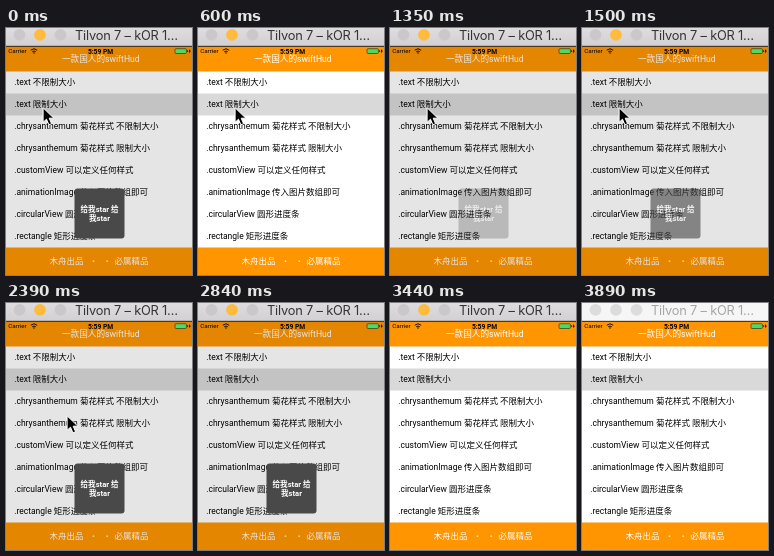
An HTML page that plays this animation: 186x247 px, repeating every 3.99 s.

```html
<!DOCTYPE html>
<html lang="zh-CN">
<head>
<meta charset="utf-8">
<title>HUD demo</title>
<style>
html, body { margin: 0; width: 100%; height: 100%; overflow: hidden; background: #fff; }
svg { display: block; width: 100vw; height: 100vh; }
text { font-family: Roboto, "Noto Sans CJK SC", "Noto Sans CJK", sans-serif; font-size: 8.5px; white-space: pre; }
.mid { text-anchor: middle; }
.light { fill: #fff; }
.nav { font-size: 8.65px; }
.title { font-family: Inter, sans-serif; font-size: 12.8px; letter-spacing: -.18px; }
.status { font-size: 6.2px; }
.clock { font-size: 6.7px; font-weight: 700; }
.hud { font-size: 7.6px; font-weight: 700; fill: #fff; }
</style>
</head>
<body>
<svg viewBox="0 0 186 247" preserveAspectRatio="none">
  <defs>
    <linearGradient id="bar" x1="0" y1="0" x2="0" y2="1">
      <stop offset="0" stop-color="#dedcde"/>
      <stop offset="1" stop-color="#d2d0d2"/>
    </linearGradient>
  </defs>

  <rect width="186" height="247" fill="#fff"/>
  <rect y="18" width="186" height="25.5" fill="#ff9500"/>
  <text class="nav mid light" x="94.8" y="34">一款国人的swiftHud</text>
  <rect y="65.5" width="186" height="22" fill="#d9d9d9"/>
  <g id="rows"></g>
  <rect y="219.5" width="186" height="27.5" fill="#ff9500"/>
  <g class="light">
    <text x="43.5" y="236.2">木舟出品</text>
    <text x="108.5" y="236.2">必属精品</text>
  </g>
  <g fill="#ffe8a8">
    <circle cx="87.5" cy="233.2" r=".9"/>
    <circle cx="101.2" cy="233.2" r=".9"/>
  </g>

  <rect id="dim" y="18" width="186" height="229" opacity=".1"/>
  <rect y="18" width="186" height="1" fill="#4a3820"/>

  <text class="status" x="2.2" y="25.2">Carrier</text>
  <path d="M24.8 22.2Q28 19.3 31.2 22.2M26.2 23.8Q28 22.2 29.8 23.8"
    fill="none" stroke="#000" stroke-width=".9"/>
  <circle cx="28" cy="25" r=".7"/>
  <text class="clock mid" x="94.5" y="25.5">5:59 PM</text>
  <rect x="169" y="20.7" width="11.4" height="4.8" rx="1" fill="#4cd964" stroke="#222" stroke-width=".6"/>
  <rect x="181" y="22.2" width=".8" height="1.8" fill="#222"/>
  <path d="M184 20.8L182.6 23.4H183.6L183.2 25.4 184.9 22.7H183.8Z"/>

  <g id="hud">
    <rect x="68.5" y="160.5" width="50" height="50" rx="3" fill="#494949"/>
    <text class="hud mid" x="93.5" y="184">给我star 给</text>
    <text class="hud mid" x="93.5" y="193">我star</text>
  </g>

  <rect id="chrome" width="186" height="18"/>
  <rect id="edge" y="17" width="186" height="1"/>
  <g id="lights">
    <circle cx="13.5" cy="6.8" r="5.9"/>
    <circle cx="34" cy="6.8" r="5.9"/>
    <circle cx="54.5" cy="6.8" r="5.9"/>
  </g>
  <text id="title" class="title" x="69" y="11.7">Tilvon 7 – kOR 1…</text>

  <path id="cursor" d="M.8 .8V15.3L4.2 12.2 6.6 17.8 9.3 16.7 6.9 11.2H11.6Z"
    stroke="#fff" stroke-width="1" stroke-linejoin="round"/>
</svg>
<script>
const LOOP = 3990;
const $ = id => document.getElementById(id);
const set = (el, attrs) => Object.entries(attrs).forEach(([k, v]) => el.setAttribute(k, v));

const labels = [
  '.text 不限制大小', '.text 限制大小',
  '.chrysanthemum 菊花样式 不限制大小', '.chrysanthemum 菊花样式 限制大小',
  '.customView 可以定义任何样式', '.animationImage 传入图片数组即可',
  '.circularView 圆形进度条', '.rectangle 矩形进度条'
];
labels.forEach((label, i) => {
  const row = document.createElementNS('http://www.w3.org/2000/svg', 'text');
  set(row, { x: 8.2, y: 57.4 + 22 * i });
  row.textContent = label;
  $('rows').append(row);
});

// Each track lists [start time, value]; a value holds until the next start.
const hudTrack = [[0, 1], [600, 0], [1350, .28], [1500, .62], [1650, .94], [1800, 1], [3440, 0]];
const cursorTrack = [[0, [36.3, 79]], [2390, [60.3, 112]], [2540, [172, 241]], [2690, [173, 243]], [2840, null]];
const at = (track, t) => track.filter(([start]) => start <= t).pop()[1];

function draw(t) {
  const alpha = at(hudTrack, t);
  set($('hud'), { opacity: alpha });
  set($('dim'), { visibility: alpha ? 'visible' : 'hidden' });

  const tip = at(cursorTrack, t);
  set($('cursor'), { visibility: tip ? 'visible' : 'hidden' });
  if (tip) set($('cursor'), { transform: `translate(${tip})` });

  const active = t < 3890;
  set($('chrome'), { fill: active ? 'url(#bar)' : '#f6f6f6' });
  set($('edge'), { fill: active ? '#b4b2b4' : '#d4d4d4' });
  set($('title'), { fill: active ? '#343434' : '#a6a6a6' });
  [...$('lights').children].forEach((light, i) => {
    const lit = active && i === 1;
    set(light, { fill: lit ? '#fdbc40' : active ? '#cac8ca' : '#dcdcdc' });
  });
}

const start = performance.now();
function tick() {
  draw((performance.now() - start) % LOOP);
  requestAnimationFrame(tick);
}
tick();
</script>
</body>
</html>
```
